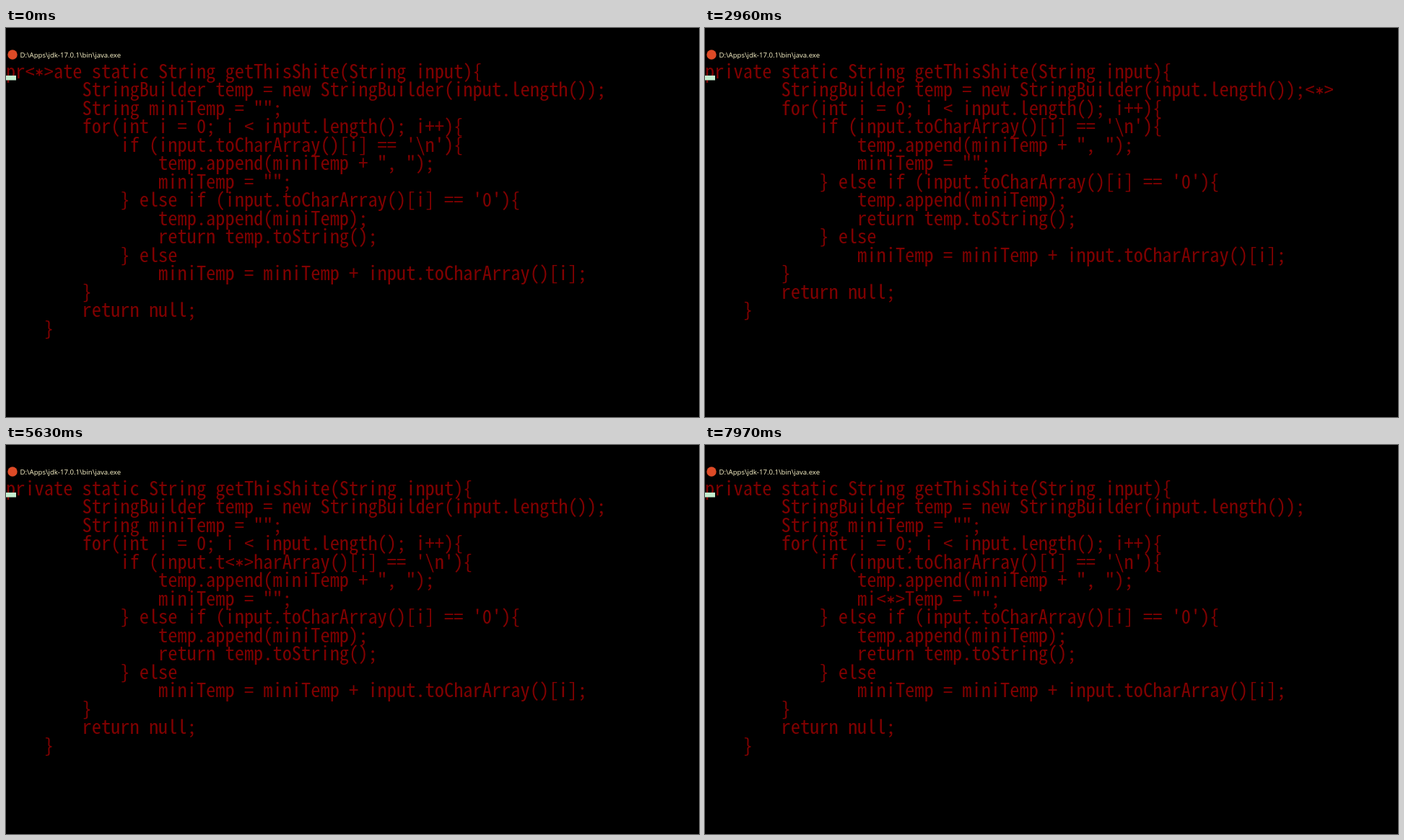
An HTML page with a canvas that plays this animation: 960 px wide and 540 px high, repeating every 8000 ms.

```html
<!DOCTYPE html>
<html lang="en">
<head>
<meta charset="utf-8">
<title>Console</title>
<style>
  html, body { margin: 0; width: 100%; height: 100%; overflow: hidden; background: #000; }
  canvas { display: block; }
</style>
</head>
<body>
<canvas id="stage" width="960" height="540"></canvas>
<script>
const ctx = document.getElementById('stage').getContext('2d');

const LOOP = 8000, FRAME = 41.73;
const CELL = 13.2, ROW = 25.5, FIRST_BASELINE = 69.7;
const MARK = '< >', COVERED = 2;

const CODE = String.raw`private static String getThisShite(String input){
        StringBuilder temp = new StringBuilder(input.length());
        String miniTemp = "";
        for(int i = 0; i < input.length(); i++){
            if (input.toCharArray()[i] == '\n'){
                temp.append(miniTemp + ", ");
                miniTemp = "";
            } else if (input.toCharArray()[i] == '0'){
                temp.append(miniTemp);
                return temp.toString();
            } else
                miniTemp = miniTemp + input.toCharArray()[i];
        }
        return null;
    }`;

// [step, character index]: the marker's slightly uneven pace
const PACE = [[0, 2], [49, 79], [71, 113], [99, 158], [119, 190],
              [120, 193], [135, 216], [171, 273], [191, 306]];

function markerIndex(step) {
  const next = Math.max(1, PACE.findIndex(([s]) => s >= step));
  const [s0, i0] = PACE[next - 1], [s1, i1] = PACE[next];
  return Math.round(i0 + (i1 - i0) * (step - s0) / (s1 - s0));
}

// Size the monospaced face so that one character fills one console cell.
const FAMILY = '"Noto Sans Mono CJK SC", "Noto Sans Mono CJK JP", "Liberation Mono", monospace';
ctx.font = `100px ${FAMILY}`;
const CODE_FONT = `${CELL * 100 / ctx.measureText('0').width}px ${FAMILY}`;

function drawTitle() {
  ctx.fillStyle = '#dd4a26';
  ctx.beginPath();
  ctx.arc(9, 37, 6.7, 0, Math.PI * 2);
  ctx.fill();
  ctx.font = '9.6px "Open Sans", sans-serif';
  ctx.fillStyle = '#fff8cc';
  ctx.fillText(String.raw`D:\Apps\jdk-17.0.1\bin\java.exe`, 19.5, 41);
}

// The asterisk sits at mid-height between its brackets.
function drawAsterisk(x, y) {
  const radius = 5;
  ctx.strokeStyle = ctx.fillStyle;
  ctx.lineWidth = 1.7;
  ctx.beginPath();
  for (let arm = 0; arm < 3; arm++) {
    const dx = radius * Math.sin(arm * Math.PI / 3);
    const dy = radius * Math.cos(arm * Math.PI / 3);
    ctx.moveTo(x - dx, y - dy);
    ctx.lineTo(x + dx, y + dy);
  }
  ctx.stroke();
}

function drawCode(index) {
  const before = CODE.slice(0, index);
  const text = before + MARK + CODE.slice(index + COVERED);
  ctx.font = CODE_FONT;
  ctx.fillStyle = '#800000';
  text.split('\n').forEach((line, row) => {
    ctx.fillText(line, 0, FIRST_BASELINE + row * ROW);
  });
  const linesBefore = before.split('\n');
  const row = linesBefore.length - 1;
  const column = linesBefore[row].length + 1;
  drawAsterisk((column + 0.5) * CELL, FIRST_BASELINE + row * ROW - 8.2);
}

function drawCursor() {
  ctx.fillStyle = '#c4efcf';
  ctx.fillRect(0, 66, 14, 6.5);
}

function draw(now) {
  const step = Math.min(191, Math.floor((now % LOOP + 8) / FRAME));
  ctx.fillStyle = '#000';
  ctx.fillRect(0, 0, 960, 540);
  drawTitle();
  drawCode(markerIndex(step));
  drawCursor();
}

const start = performance.now();
function tick() {
  draw(performance.now() - start);
  requestAnimationFrame(tick);
}
tick();
</script>
</body>
</html>
```
